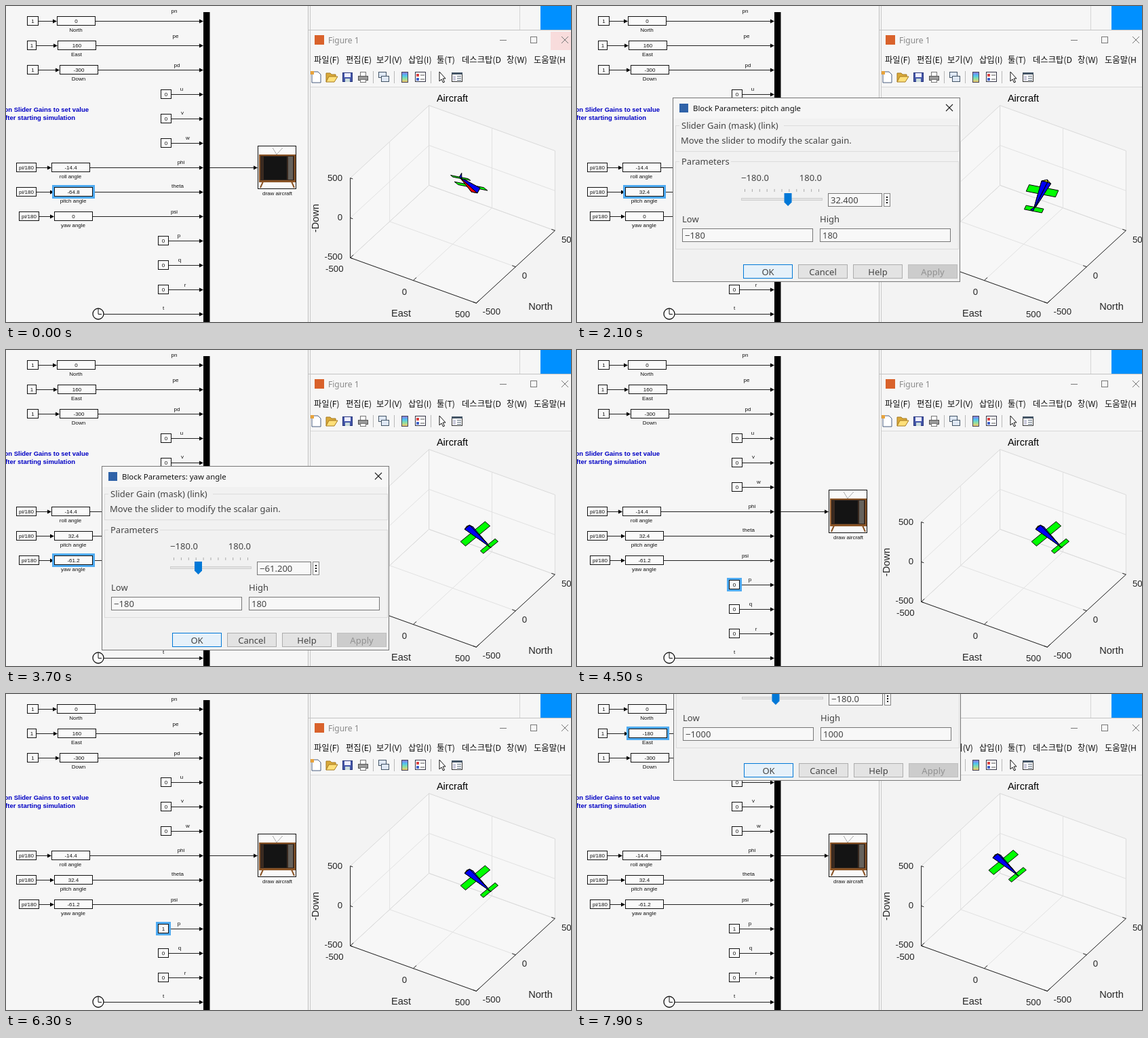
Recreate the animation shown at these times as an HTML page with a canvas. Size 833x466 px, loop 8 s.

```html
<!DOCTYPE html>
<html lang="en">
<head>
<meta charset="utf-8">
<title>Aircraft attitude sliders</title>
<style>
html, body { margin: 0; width: 100%; height: 100%; overflow: hidden; background: #f6f6f6; }
canvas { display: block; }
</style>
</head>
<body>
<canvas id="stage" width="833" height="466"></canvas>
<script>
const ctx = document.getElementById('stage').getContext('2d');
const LOOP = 8000;
const PAPER = '#f6f6f6', INK = '#444', BLUE = '#0078d7';
const ARIAL = '"Liberation Sans", Arial, sans-serif';
const UI = '"Noto Sans", sans-serif';
const KOREAN = '"Noto Sans CJK KR", "Noto Sans CJK", sans-serif';

// ---------- drawing helpers ----------
function rect(x, y, w, h, fill, stroke, lw = 1) {
  if (fill) { ctx.fillStyle = fill; ctx.fillRect(x, y, w, h); }
  if (stroke) {
    ctx.strokeStyle = stroke; ctx.lineWidth = lw;
    ctx.strokeRect(x + lw / 2, y + lw / 2, w - lw, h - lw);
  }
}
function path(points, { fill, stroke, lw = 1, close = !!fill } = {}) {
  ctx.beginPath();
  points.forEach(([x, y], i) => i ? ctx.lineTo(x, y) : ctx.moveTo(x, y));
  if (close) ctx.closePath();
  if (fill) { ctx.fillStyle = fill; ctx.fill(); }
  if (stroke) { ctx.strokeStyle = stroke; ctx.lineWidth = lw; ctx.stroke(); }
}
const line = (x1, y1, x2, y2, stroke, lw = 1) => path([[x1, y1], [x2, y2]], { stroke, lw });

// y is the middle of the capital letters
function text(s, x, y, size, { family = ARIAL, color = '#111', align = 'left', weight = '' } = {}) {
  ctx.font = `${weight} ${size}px ${family}`;
  ctx.fillStyle = color;
  ctx.textAlign = align;
  ctx.fillText(s, x, y + size * 0.36);
}
// Dialog text has wide hyphens
const ui = (s, x, y, color = INK, align = 'left') =>
  text(String(s).replace(/-/g, '\u2212'), x, y, 13, { family: UI, color, align });
const small = (s, x, y) => text(s, x, y, 8, { align: 'center' });

// ---------- time ----------
function track(keys, t, step) {
  let v = keys[keys.length - 1][1];
  if (t <= keys[0][0]) v = keys[0][1];
  else for (let i = 1; i < keys.length; i++) {
    const [t0, v0] = keys[i - 1], [t1, v1] = keys[i];
    if (t <= t1) { v = v0 + (v1 - v0) * (t - t0) / (t1 - t0); break; }
  }
  return Math.round(v / step) * step;
}
const SLIDERS = [
  { name: 'pitch angle', key: 'theta', x: 141, y: 136, open: 200, grab: 900, drop: 2100, shut: 2500,
    limit: 180, step: 3.6, keys: [[900, -64.8], [1000, -54], [1500, -7.2], [1700, -3.6], [2000, 32.4]] },
  { name: 'yaw angle', key: 'psi', x: 141, y: 172, open: 3000, grab: 3200, drop: 3700, shut: 3900,
    limit: 180, step: 3.6, keys: [[3200, 0], [3600, -61.2]] },
  { name: 'East', key: 'east', x: 142, y: -143, open: 6600, grab: 6700, drop: 7700, shut: LOOP,
    limit: 1000, step: 20, keys: [[6700, 160], [7000, 360], [7400, -180]] }
];
function stateAt(t) {
  const live = {}, shown = {};
  for (const s of SLIDERS) {
    live[s.key] = track(s.keys, t, s.step);
    shown[s.key] = t < s.drop ? s.keys[0][1] : live[s.key];
  }
  const selected = t < 3000 ? 'theta' : t < 4500 ? 'psi' : t < 6500 ? 'p' : 'east';
  return { t, live, shown, selected, p: t < 6200 ? 0 : 1 };
}

// ---------- block diagram ----------
function box(x, y, w, label, selected) {
  if (selected) rect(x - 3, y - 10, w + 6, 20, '#4fabf2');
  rect(x, y - 7, w, 14, '#fafafa', '#111');
  small(label, x + w / 2, y + 0.3);
}
function arrow(x1, x2, y) {
  line(x1, y + 0.5, x2 - 4, y + 0.5, '#222');
  path([[x2 - 6, y - 2.5], [x2, y + 0.5], [x2 - 6, y + 3.5]], { fill: '#000' });
}
function drawTv() {
  rect(371, 206, 57, 64, '#fafafa', '#111');
  path([[393, 209], [399, 219], [408, 209]], { stroke: '#aaa' });
  path([[379, 259], [375, 268]], { stroke: '#8a5426', lw: 2 });
  path([[421, 259], [425, 268]], { stroke: '#8a5426', lw: 2 });
  rect(373, 219, 54, 41, '#8a5426');
  rect(375, 221, 50, 36, '#3a2a20');
  rect(380, 222, 34, 34, '#141414');
  rect(416, 222, 7, 34, '#66625c');
  small('draw aircraft', 400, 276.5);
}
function drawDiagram(s) {
  const gains = [
    [22, '1', 31, 17, 75, '0', 'North', 'pn', 248, 7],
    [58, '1', 31, 14, 76, s.shown.east, 'East', 'pe', 250, 44, 'east'],
    [94, '1', 31, 17, 79, '-300', 'Down', 'pd', 252, 87],
    [238, 'pi/180', 15, 30, 67, '-14.4', 'roll angle', 'phi', 258, 230],
    [274, 'pi/180', 15, 30, 71, s.shown.theta.toFixed(1), 'pitch angle', 'theta', 253, 265, 'theta'],
    [310, 'pi/180', 19, 30, 71, +s.shown.psi.toFixed(1), 'yaw angle', 'psi', 248, 303, 'psi']
  ];
  for (const [y, unit, ux, uw, x, value, name, signal, sx, sy, key] of gains) {
    arrow(ux + uw, x, y);
    arrow(x + 57, 291, y);
    box(ux, y, uw, unit);
    box(x, y, 57, value, key === s.selected);
    small(name, x + 28, y + 13);
    small(signal, sx, sy);
  }
  const constants = [
    [130, 228, 'u', 259, 122], [166, 228, 'v', 260, 157], [202, 228, 'w', 268, 194],
    [346, 224, 'p', 255, 338], [382, 224, 'q', 256, 374], [418, 224, 'r', 264, 411]
  ];
  for (const [y, x, signal, sx, sy] of constants) {
    arrow(x + 16, 291, y);
    box(x, y, 16, signal === 'p' ? s.p : 0, signal === s.selected);
    small(signal, sx, sy);
  }
  arrow(144, 291, 454);
  ctx.beginPath(); ctx.arc(136, 454, 8, 0, 7);
  ctx.fillStyle = '#fff'; ctx.fill();
  ctx.strokeStyle = '#111'; ctx.lineWidth = 1.3; ctx.stroke();
  path([[136, 447], [136, 454.5], [141, 454.5]], { stroke: '#111' });
  small('t', 232, 445);

  rect(291, 9, 9.5, 457, '#000');
  arrow(300, 371, 238);
  drawTv();
  const note = { align: 'right', weight: 'bold', color: '#0000c4' };
  text('on Slider Gains to set value', 122, 153, 9.5, note);
  text('after starting simulation', 102, 165, 9.5, note);
}

// ---------- figure window ----------
function drawToolbar() {
  path([[451, 97], [460, 97], [464, 101], [464, 113], [451, 113]], { fill: '#fff', stroke: '#4a5f80' });
  rect(449, 96, 5, 5, '#e8a33c');
  path([[472, 112], [472, 99], [478, 99], [480, 101], [486, 101], [486, 104]], { fill: '#d9a93a', stroke: '#a67a20' });
  path([[472, 112], [476, 104], [489, 104], [484, 112]], { fill: '#ffe07a', stroke: '#a67a20' });
  rect(496, 98, 15, 14, '#4456a8', '#26357c');
  rect(499, 99, 9, 6, '#eef'); rect(500, 107, 7, 5, '#cdd');
  rect(522, 97, 9, 7, '#fff', '#777'); rect(519, 103, 15, 7, '#999', '#555');
  rect(522, 108, 9, 5, '#fff', '#777');
  rect(549, 97, 12, 9, '#dfe8f5', '#456'); rect(553, 103, 12, 9, '#dfe8f5', '#456');
  const rainbow = ctx.createLinearGradient(0, 98, 0, 112);
  ['#8a7be0', '#4fc3f0', '#8ee0a0', '#f5c56a'].forEach((c, i) => rainbow.addColorStop(i / 3, c));
  rect(583, 97, 10, 16, rainbow, '#445');
  rect(603, 97, 16, 15, '#fff', '#334');
  rect(605, 100, 4, 4, '#d44'); rect(605, 106, 4, 4, '#46c');
  line(611, 102, 617, 102, '#555'); line(611, 108, 617, 108, '#555');
  path([[639, 97], [639, 111], [642, 108], [644.5, 113], [646.5, 112], [644, 107], [648, 107]],
    { fill: '#fff', stroke: '#111' });
  rect(657, 98, 16, 14, '#fff', '#333'); rect(657, 98, 16, 3, '#456');
  rect(659, 103, 4, 7, '#ccd'); rect(665, 103, 6, 1, '#567');
  rect(665, 106, 6, 1, '#567'); rect(665, 109, 6, 1, '#567');
  for (const x of [541.5, 572.5, 626.5]) line(x, 96, x, 114, '#b8b8b8');
}
function drawFigureFrame(t) {
  rect(445, 0, 388, 466, PAPER);
  rect(788, 0, 45, 36, '#0090ff');
  line(757.5, 0, 757.5, 36, '#d5d5d5');
  line(445, 35.5, 833, 35.5, '#c4c4c4');
  rect(448, 120, 385, 346, '#f3f3f3');
  line(448, 119.5, 833, 119.5, '#d8d8d8');
  line(445.5, 0, 445.5, 466, '#bdbdbd');
  line(448.5, 0, 448.5, 466, '#c8c8c8');
  if (t < 100) rect(803, 38, 30, 27, '#f8dcdc');
  rect(455, 43, 14, 14, '#d9622b');
  text('Figure 1', 475, 50.5, 12, { family: UI, color: '#8a8a8a' });
  line(728, 50.5, 738, 50.5, '#777');
  rect(773, 45, 10, 10, null, '#777');
  line(819, 45, 829, 55, '#777'); line(829, 45, 819, 55, '#777');

  const menu = [['파일(F)', 454], ['편집(E)', 501], ['보기(V)', 546], ['삽입(I)', 593],
    ['툴(T)', 635], ['데스크탑(D', 672], ['창(W)', 738], ['도움말(H', 778]];
  for (const [label, x] of menu) text(label, x, 79.5, 12.3, { family: KOREAN, color: '#111' });
  drawToolbar();
}

// Orthographic view: azimuth 32, elevation 47 degrees
const AZ = 32 * Math.PI / 180, EL = 47 * Math.PI / 180;
const SX = 0.219, SY = 0.1725;
function project([e, n, u]) {
  const away = -e * Math.sin(AZ) + n * Math.cos(AZ);
  return [658.5 + SX * (e * Math.cos(AZ) + n * Math.sin(AZ)),
          292.4 - SY * (away * Math.sin(EL) + u * Math.cos(EL))];
}
const nearness = ([e, n, u]) =>
  (e * Math.sin(AZ) - n * Math.cos(AZ)) * Math.cos(EL) + u * Math.sin(EL);

function drawAxes() {
  const L = 500;
  const poly = (pts, style) => path(pts.map(project), style);
  const floor = [[-L, -L, -L], [L, -L, -L], [L, L, -L], [-L, L, -L]];
  const west = [[-L, -L, -L], [-L, L, -L], [-L, L, L], [-L, -L, L]];
  const north = [[-L, L, -L], [L, L, -L], [L, L, L], [-L, L, L]];
  for (const wall of [floor, west, north]) poly(wall, { fill: '#f7f7f7', stroke: '#dadada' });
  const grid = { stroke: '#e2e2e2' };
  poly([[0, -L, -L], [0, L, -L], [0, L, L]], grid);
  poly([[L, 0, -L], [-L, 0, -L], [-L, 0, L]], grid);
  poly([[-L, -L, 0], [-L, L, 0], [L, L, 0]], grid);
  const edge = { stroke: '#222' };
  poly([[-L, -L, L], [-L, -L, -L], [L, -L, -L], [L, L, -L]], edge);
  for (const v of [-L, 0, L]) {
    poly([[-L, -L, v], [-L + 20, -L, v]], edge);
    poly([[v, -L, -L], [v, -L + 40, -L]], edge);
    poly([[L, v, -L], [L - 28, v, -L]], edge);
  }
  const ticks = [['500', 496, 253], ['0', 496, 311.5], ['-500', 496, 369.5], ['-500', 497.5, 387.5],
    ['0', 591, 421.5], ['500', 684, 454.5], ['-500', 729, 450.5], ['0', 768, 397.5], ['500', 841, 344.5]];
  for (const [s, x, y] of ticks) text(s, x, y, 13.2, { align: 'right', color: '#262626' });
  const label = { align: 'center', color: '#262626' };
  text('Aircraft', 658, 136, 14.6, { align: 'center', color: '#000' });
  text('East', 582.5, 453, 14.6, label);
  text('North', 788, 443, 14.6, label);
  ctx.save();
  ctx.translate(456, 313);
  ctx.rotate(-Math.PI / 2);
  text('-Down', 0, 0, 14.6, label);
  ctx.restore();
}

// Body axes: x forward, y right, z down
const nose = [72, 0, 0], stern = [-216, 0, 0];
const ring = [[48, 24, -24], [48, -24, -24], [48, -24, 24], [48, 24, 24]];
const plate = (front, back, half) =>
  [[front, half, 0], [back, half, 0], [back, -half, 0], [front, -half, 0]];
const FACES = [
  ...ring.map((v, i) => ({ color: '#ffff00', pts: [nose, v, ring[(i + 1) % 4]] })),
  ...ring.map((v, i) => ({ color: i === 2 ? '#ff0000' : '#0000f5', pts: [stern, v, ring[(i + 1) % 4]] })),
  { color: '#00ff00', pts: plate(0, -60, 120) },
  { color: '#00ff00', pts: plate(-180, -216, 72), tail: true },
  { color: '#0000f5', pts: [[-180, 0, 0], [-216, 0, -38], stern], tail: true }
];
function turn(a, b, deg) {
  const c = Math.cos(deg * Math.PI / 180), s = Math.sin(deg * Math.PI / 180);
  return [a * c - b * s, a * s + b * c];
}
function drawPlane({ t, live }) {
  const place = ([x, y, z]) => {
    [x, y] = turn(x, y, live.psi);
    [z, x] = turn(z, x, live.theta);
    [y, z] = turn(y, z, -14.4);
    return [live.east + y, x, 300 - z];
  };
  const redrawing = t >= 7000 && t < 7100;
  FACES.filter(f => !(redrawing && f.tail))
    .map(f => {
      const pts = f.pts.map(place);
      return { pts, color: f.color, near: pts.reduce((sum, p) => sum + nearness(p), 0) / pts.length };
    })
    .sort((a, b) => a.near - b.near)
    .forEach(f => path(f.pts.map(project), { fill: f.color, stroke: '#000' }));
}

// ---------- dialogs ----------
function dialogFrame(w, h, title) {
  rect(0, -1, w, h + 1, '#f1f1f1', '#777');
  rect(1, 0, w - 2, 30, PAPER);
  rect(10, 8, 13, 13, '#2f62a8');
  text(title, 30, 14.5, 11.4, { family: UI, color: '#111' });
  const x = w - 21;
  path([[x, 9], [x + 10, 19]], { stroke: '#222', lw: 1.1 });
  path([[x + 10, 9], [x, 19]], { stroke: '#222', lw: 1.1 });
}
function group(x, y, w, h, label, labelWidth) {
  rect(x, y, w, h, null, '#dcdcdc');
  rect(x + 6, y - 1, labelWidth, 3, '#f1f1f1');
  ui(label, x + 9, y);
}
function edit(x, y, w, value, { border = '#777', fill = '#f8f8f8', color = INK } = {}) {
  rect(x, y, w, 20, fill, border);
  ui(value, x + 4, y + 10.5, color);
}
function dots(x, y, color = '#111') {
  rect(x, y, 10, 20, PAPER, '#888');
  for (const d of [5, 9, 13]) rect(x + 4, y + d, 2, 2, color);
}
function button(x, label, { fill = '#e3e3e3', border = '#adadad', lw = 1, color = INK } = {}) {
  rect(x, 245, 73, 21, fill, border, lw);
  ui(label, x + 36.5, 256.5, color, 'center');
}
function drawSliderDialog(d, s) {
  const { t } = s, value = s.live[d.key];
  const held = t >= d.grab && t < d.drop, done = t >= d.drop;
  ctx.save();
  ctx.translate(d.x, d.y);
  dialogFrame(424, 271, 'Block Parameters: ' + d.name);
  group(4, 40, 418, 39, 'Slider Gain (mask) (link)', 154);
  ui('Move the slider to modify the scalar gain.', 12, 62.5);
  group(4, 93, 418, 130, 'Parameters', 76);

  ui((-d.limit).toFixed(1), 101, 117.5);
  ui(d.limit.toFixed(1), 220, 117.5, INK, 'right');
  for (let i = 0; i <= 10; i++) line(106.5 + 10.9 * i, 134, 106.5 + 10.9 * i, 138, '#aaa');
  rect(101, 147, 120, 4, '#e4e4e4', '#cfcfcf');
  const x = 160.5 + value / d.limit * 53;
  path([[x - 5.5, 140], [x + 5.5, 140], [x + 5.5, 153.5], [x, 159], [x - 5.5, 153.5]],
    { fill: held ? '#c6c6c6' : BLUE });

  const shown = held || Math.abs(value) >= 100 ? value.toFixed(1) : value.toFixed(3);
  edit(229, 140, 80, shown);
  dots(311, 140);
  ui('Low', 14, 178.5);
  ui('High', 217, 178.5);
  edit(14, 192, 193, -d.limit);
  edit(217, 192, 193, d.limit);
  button(104, 'OK', done ? { fill: '#e6f1fa', border: BLUE } : { border: BLUE, lw: 2 });
  button(185, 'Cancel');
  button(266, 'Help');
  button(347, 'Apply', { fill: '#cccccc', border: '#bfbfbf', color: '#929292' });
  ctx.restore();
}
function drawConstantDialog(t) {
  ctx.save();
  ctx.translate(253, 169);
  dialogFrame(470, 320, 'Block Parameters: Constant6');
  group(4, 40, 461, 82, 'Constant', 62);
  ["Output the constant specified by the 'Constant value' parameter. If",
   "'Constant value' is a vector and 'Interpret vector parameters as 1-D' is",
   'on, treat the constant value as a 1-D array. Otherwise, output a matrix',
   'with the same dimensions as the constant value.'
  ].forEach((s, i) => ui(s, 12, 62.5 + 15 * i));

  rect(4, 151, 461, 144, PAPER, '#d9d9d9');
  rect(57, 132, 120, 20, '#eeeeee', '#d9d9d9');
  rect(4, 130, 54, 22, PAPER, '#d9d9d9');
  rect(5, 150, 52, 3, PAPER);
  ui('Main', 15, 141.5);
  ui('Signal Attributes', 68, 142);
  ui('Constant value:', 9, 164.5);
  const typed = t >= 5900, focused = t >= 5500;
  edit(11, 179, 434, typed ? 1 : 0, { border: focused ? BLUE : '#777' });
  if (focused && !typed) {
    rect(14, 182, 8, 14, BLUE);
    ui('0', 15, 189.5, '#fff');
  }
  dots(447, 179);
  rect(7, 210, 13, 13, PAPER, '#bbb');
  path([[9, 216], [12, 220], [18, 212]], { stroke: '#999', lw: 1.4 });
  ui('Interpret vector parameters as 1-D', 25, 217, '#9a9a9a');
  ui('Sample time:', 9, 241.5);
  edit(11, 256, 434, 'inf', { border: '#c8c8c8', fill: '#f2f2f2', color: '#9a9a9a' });
  dots(447, 256, '#aaa');
  ctx.restore();
}

// ---------- loop ----------
function draw(now) {
  const t = Math.floor(now % LOOP / 100) * 100;
  const s = stateAt(t);
  rect(0, 0, 833, 466, PAPER);
  drawDiagram(s);
  drawFigureFrame(t);
  drawAxes();
  drawPlane(s);
  for (const d of SLIDERS) if (t >= d.open && t < d.shut) drawSliderDialog(d, s);
  if (t >= 5100 && t < 6200) drawConstantDialog(t);
}
let start;
function tick(now) {
  start ??= now;
  draw(now - start);
  requestAnimationFrame(tick);
}
draw(0);
requestAnimationFrame(tick);
</script>
</body>
</html>
```
